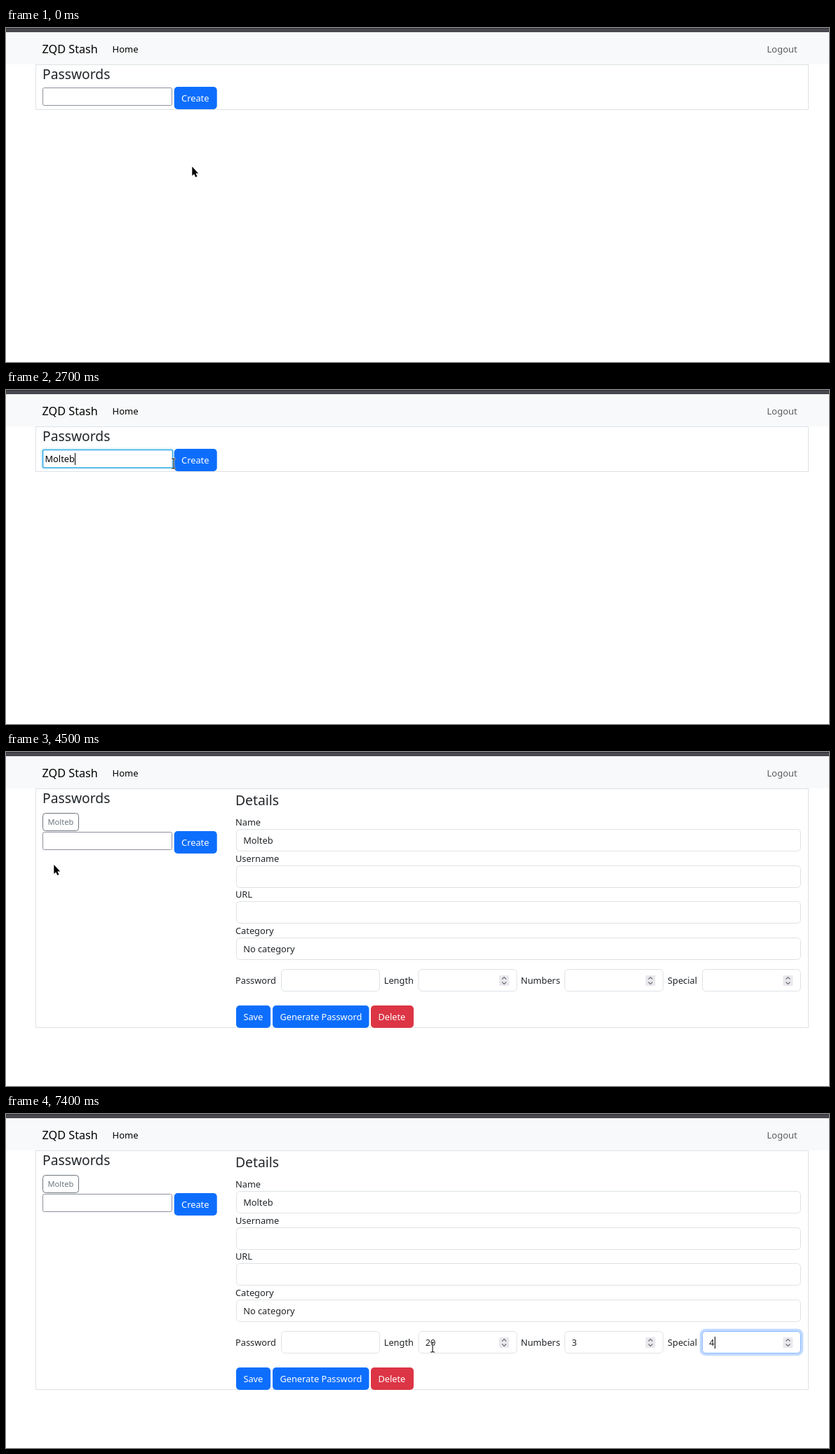
An HTML page for the animation above (8 s loop, 1173x477 px).

```html
<!DOCTYPE html>
<html lang="en">
<head>
<meta charset="utf-8">
<title>Password manager</title>
<style>
html, body { margin: 0; height: 100%; overflow: hidden; background: #fff; }
svg { display: block; width: 1173px; height: 477px; font-family: "Noto Sans", sans-serif; }
text { white-space: pre; }
</style>
</head>
<body>
<svg id="stage" viewBox="0 0 1173 477"></svg>
<script>
const LOOP = 8000, STEP = 100, BODY = 12.8;
const ALERT_AT = 3000, DETAILS_AT = 4300;
const BRAND = 'ZQD Stash', ENTRY = 'Molteb';
const INK = '#212529', LINE = '#dee2e6', BLUE = '#0d6efd', GRAY = '#6c757d';

// Pointer way points: time, x, y
const route = [
  [0, 265, 197], [200, 250, 180], [500, 180, 125], [700, 130, 100], [1000, 62, 100],
  [1100, 58, 100], [1400, 133, 110], [1600, 185, 151], [1800, 226, 123], [1900, 226, 123],
  [2200, 226, 104], [2300, 226, 104], [2700, 239, 105], [2900, 272, 106], [3100, 308, 149],
  [3200, 335, 200], [3400, 420, 290], [3500, 440, 312], [3700, 330, 270], [4000, 85, 170],
  [4100, 68, 160], [4500, 68, 160], [5000, 516, 335], [5400, 592, 335], [5700, 608, 333],
  [LOOP, 608, 333]
];

const stage = document.getElementById('stage');
const ruler = document.createElement('canvas').getContext('2d');
let out, mouse, pointer;

const clamp = v => Math.max(0, Math.min(1, v));

function pointerAt(t) {
  const i = route.findIndex(p => p[0] > t);
  const [t0, x0, y0] = route[i - 1], [t1, x1, y1] = route[i];
  const k = (t - t0) / (t1 - t0);
  return { x: x0 + (x1 - x0) * k, y: y0 + (y1 - y0) * k };
}

function rect(x, y, w, h, fill, stroke = 'none', r = 0, width = 1) {
  out += `<rect x="${x}" y="${y}" width="${w}" height="${h}" rx="${r}" fill="${fill}" stroke="${stroke}" stroke-width="${width}"/>`;
}

function text(x, y, str, size = BODY, fill = INK) {
  out += `<text x="${x}" y="${y}" font-size="${size}" fill="${fill}">${str}</text>`;
}

function path(d, stroke, width, fill = 'none') {
  out += `<path d="${d}" fill="${fill}" stroke="${stroke}" stroke-width="${width}"/>`;
}

function caret(x, y, str) {
  ruler.font = `${BODY}px "Noto Sans", sans-serif`;
  rect(Math.round(x + ruler.measureText(str).width), y - 13, 1, 17, '#000');
}

// True when the pointer is inside the box; also picks the pointer shape
function over(x, y, w, h, shape) {
  const hit = mouse.x >= x && mouse.x < x + w && mouse.y >= y && mouse.y < y + h;
  if (hit) pointer = shape;
  return hit;
}

function button(x, y, w, label, fill = BLUE, hover = '#0b5ed7') {
  rect(x, y, w, 32, over(x, y, w, 32, hand) ? hover : fill, 'none', 5);
  text(x + 10.4, y + 21, label, BODY, '#fff');
}

function field(x, y, w, value = '', focus = 0, active = false) {
  over(x, y, w, 31, beam);
  if (focus > 0) rect(x - 2, y - 2, w + 4, 35, 'none', `rgba(13,110,253,${0.25 * focus})`, 6.5, 3.6);
  rect(x, y, w, 31, '#fff', focus > 0.3 ? '#86b7fe' : LINE, 5);
  text(x + 9.7, y + 20.5, value);
  if (active) caret(x + 10, y + 20.5, value);
}

function spinner(x) {
  rect(x - 7, 319, 14, 15, '#e9e9ed', 'none', 1);
  path(`M${x - 3} 324.5l3-3 3 3M${x - 3} 328.5l3 3 3-3`, '#6b6b73', 1.1);
}

function header() {
  rect(0, 0, 1173, 6, '#4a484f');
  rect(0, 0, 1173, 1, '#2f2d34');
  rect(0, 6, 1173, 46, '#f8f9fa');
  text(51.5, 36, BRAND, 16.2, '#000');
  text(151.5, 34.5, 'Home', 13, '#000');
  text(1084.5, 34.5, 'Logout', 13, '#5a5b5c');
}

function sidebar(t, top, listed) {
  text(52, top + 20.5, 'Passwords', 19.3);
  if (listed) {
    const hover = over(52, top + 35, 52, 26, hand);
    rect(52.5, top + 35.5, 51, 25, hover ? GRAY : '#fff', GRAY, 4);
    text(59.5, top + 52, ENTRY, 11.1, hover ? '#fff' : GRAY);
    top += 29;
  }
  const y = top + 33.5, focused = t >= 800 && t < 2900;
  over(52, y, 188, 24, beam);
  if (focused) {
    rect(51, y - 1.5, 188, 28, 'none', 'rgba(60,180,235,.14)', 4, 3);
    rect(52.5, y, 185, 25.5, '#fff', '#30aae4', 2, 1.6);
  } else {
    rect(52.5, y, 184, 25, '#fff', '#8f8f9d', 2);
  }
  const typed = t < DETAILS_AT ? ENTRY.slice(0, Math.max(0, (t - 1900) / 50)) : '';
  text(55.5, y + 17.7, typed, BODY, '#000');
  if (focused) caret(56, y + 17.5, typed);
  button(239.7, top + 32, 61, 'Create');
}

function details(t) {
  text(327, 76, 'Details', 19.3);
  [['Name', ENTRY], ['Username', ''], ['URL', ''], ['Category', 'No category']].forEach(([label, value], i) => {
    const y = 105 + i * 51.7;
    text(327, y, label);
    field(328.5, Math.round(y) + 5.5, 804, value);
  });

  text(327, 331, 'Password');
  field(392.5, 310.5, 140);
  // label, label x, field x, focus start, focus end, typing time, value
  [['Length', 538.7, 588, 5450, 6450, 6300, '20'],
   ['Numbers', 733.7, 796.5, 6450, 7050, 6800, '3'],
   ['Special', 943, 992.5, 7050, Infinity, 7400, '4']
  ].forEach(([label, labelX, x, start, end, typedAt, value]) => {
    const focus = clamp((t - start) / 150) - clamp((t - end) / 150);
    text(labelX, 331, label);
    field(x, 310.5, 140, t >= typedAt ? value : '', focus, t >= start && t < end);
    spinner(x + 122);
  });

  button(328, 362, 49, 'Save');
  button(380, 362, 137.5, 'Generate Password');
  button(520, 362, 61, 'Delete', '#dc3545', '#bb2d3b');
}

function arrow() {
  const d = 'M.3 1V14L3.1 11.4L5.3 16L7.5 15L5.3 10.6H9.1Z';
  path(d, '#fff', 1.6);
  path(d, 'none', 0, '#000');
}

function beam() {
  const d = 'M-3 -7H-1L0 -6L1 -7H3M0 -6V6M-3 7H-1L0 6L1 7H3';
  path(d, 'rgba(255,255,255,.8)', 2.6);
  path(d, '#111', 1.1);
}

function hand() {
  path('M-1 0Q0-1 1 0V6L6 7Q8 8 7 11L6 15H0L-4 9Q-4 7-1 9Z', '#fff', 1, '#000');
}

function draw(t) {
  out = '';
  mouse = pointerAt(t);
  pointer = arrow;
  const alert = t >= ALERT_AT && t < DETAILS_AT, detailed = t >= DETAILS_AT;
  const top = alert ? 114 : 52;
  header();
  if (alert) {
    rect(52.5, 53, 1081, 47.5, '#d1e7dd', '#a3cfbb', 5);
    text(65, 81.7, 'Password create successfully', BODY, '#0a3622');
  }
  rect(42.5, top + .5, 1101, detailed ? 341 : alert ? 93 : 64, '#fff', LINE);
  sidebar(t, top, alert || detailed);
  if (detailed) details(t);
  out += `<g transform="translate(${mouse.x} ${mouse.y})">`;
  pointer();
  stage.innerHTML = out + '</g>';
}

let shown = -1;
function tick() {
  const t = Math.floor(performance.now() % LOOP / STEP) * STEP;
  if (t !== shown) draw(shown = t);
  requestAnimationFrame(tick);
}
tick();
</script>
</body>
</html>
```
